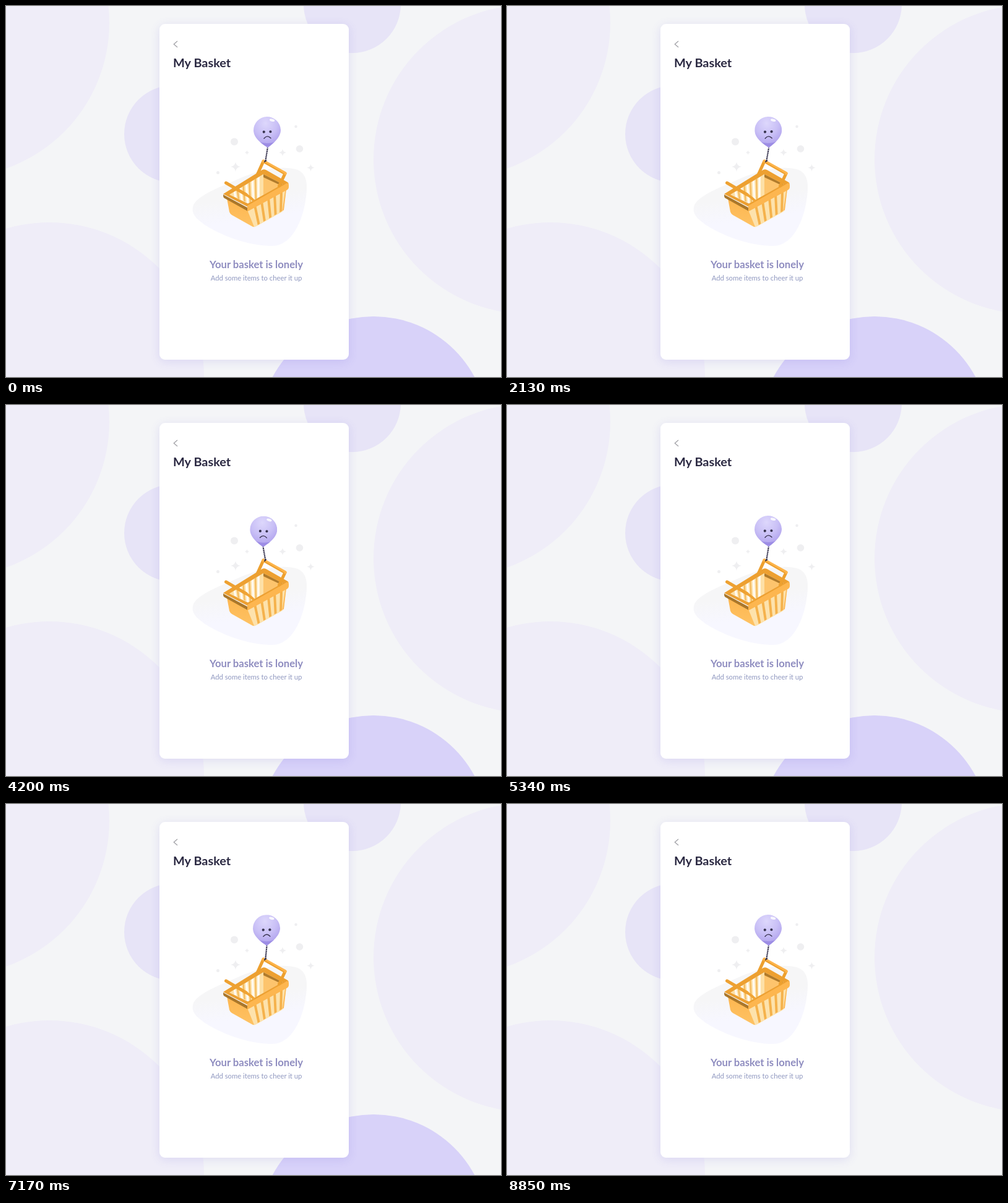
Recreate the animation shown at these times as an HTML page. Size 800 px wide and 600 px high, loop 8880 ms.

```html
<!DOCTYPE html>
<html lang="en">
<head>
<meta charset="utf-8">
<title>My Basket</title>
<style>
  @property --s { syntax: "<number>"; inherits: true; initial-value: 0; }

  html, body { margin: 0; width: 100%; height: 100%; overflow: hidden; background: #f4f5f7; }
  .stage { position: relative; width: 800px; height: 600px; overflow: hidden; }
  svg { position: absolute; left: 0; top: 0; display: block; }
  .card {
    position: absolute; left: 248px; top: 29px; width: 306px; height: 543px;
    border-radius: 9px; background: #fff;
    box-shadow: 0 3px 16px rgba(95, 75, 210, .14);
  }
  text { font-family: Lato, sans-serif; }
  .title { font-size: 19.9px; font-weight: 700; fill: #2b2942; }
  .head { font-size: 16.65px; font-weight: 700; fill: #8f8dc0; text-anchor: middle; }
  .sub { font-size: 11.25px; fill: #9098c0; text-anchor: middle; }

  /* --s is the sideways offset of the balloon in pixels */
  .sway { animation: sway 8880ms infinite; }
  .balloon {
    transform: translate(calc(423px + var(--s) * 1.3px), calc(229px - var(--s) * .12px))
               rotate(calc(-2deg - var(--s) * .62deg));
  }
  .rope { transform: translate(419.3px, 251px) rotate(calc(9.2deg + var(--s) * 3.3deg)); }
  .accent { animation: blink 8880ms step-end infinite; }

  @keyframes sway {
    0%      { --s: 0;    animation-timing-function: cubic-bezier(.39, .575, .565, 1); }
    10.484% { --s: -6.2; animation-timing-function: cubic-bezier(.47, 0, .745, .715); }
    23.986% { --s: .2;   animation-timing-function: cubic-bezier(.39, .575, .565, 1); }
    30.191% { --s: 1.8;  animation-timing-function: cubic-bezier(.47, 0, .745, .715); }
    47.297% { --s: -5.8; animation-timing-function: cubic-bezier(.39, .575, .565, 1); }
    49.899% { --s: -6.2; animation-timing-function: cubic-bezier(.47, 0, .745, .715); }
    60.135% { --s: 0;    animation-timing-function: cubic-bezier(.39, .575, .565, 1); }
    69.595% { --s: 1.8;  animation-timing-function: cubic-bezier(.47, 0, .745, .715); }
    80.743% { --s: -1;   animation-timing-function: cubic-bezier(.39, .575, .565, 1); }
    89.313% { --s: -6.2; animation-timing-function: cubic-bezier(.47, 0, .745, .715); }
    99.662%, 100% { --s: 0; }
  }
  @keyframes blink {
    0% { visibility: visible; }
    99.66%, 100% { visibility: hidden; }
  }
</style>
</head>
<body>
<div class="stage">
  <svg width="800" height="600">
    <g fill="#efedf8">
      <circle cx="-83" cy="27" r="250"/>
      <circle cx="844" cy="248" r="250"/>
      <circle cx="70" cy="600" r="250"/>
    </g>
    <g fill="#e7e4f7">
      <circle cx="269.5" cy="207" r="78.5"/>
      <circle cx="559.5" cy="-2.5" r="78.5"/>
    </g>
    <circle class="accent" cx="594" cy="687" r="185" fill="#d8d2f9"/>
  </svg>

  <div class="card"></div>

  <svg width="800" height="600">
    <defs>
      <linearGradient id="ground" x1=".2" y1="0" x2=".4" y2="1">
        <stop offset=".4" stop-color="#f6f6f7"/>
        <stop offset=".7" stop-color="#f7f7ff"/>
      </linearGradient>
      <linearGradient id="side" x1="0" y1="0" x2="0" y2="1">
        <stop offset="0" stop-color="#fdb650"/>
        <stop offset="1" stop-color="#fec263"/>
      </linearGradient>
      <radialGradient id="skin" cx=".45" cy=".22" r=".8">
        <stop offset="0" stop-color="#ddd7fc"/>
        <stop offset=".5" stop-color="#c9c0f6"/>
        <stop offset="1" stop-color="#a898ea"/>
      </radialGradient>
      <path id="star" d="M0-8Q.9-.9 8 0Q.9 .9 0 8Q-.9 .9-8 0Q-.9-.9 0-8Z"/>
      <clipPath id="skinClip">
        <path d="M0 0C-4-3-22-14-22-28A22 22 0 0 1 22-28C22-14 4-3 0 0Z"/>
      </clipPath>
      <clipPath id="wallClip">
        <path d="M390 329L453 296L449 330L402 357Z"/>
      </clipPath>
      <clipPath id="insideClip">
        <path d="M361 305L416 272L447 288L392 319Z"/>
      </clipPath>
    </defs>

    <path d="M277 56.8L271.3 61.7L277 66.8" fill="none" stroke="#a5a5aa" stroke-width="1.4"/>
    <text class="title" x="270" y="99.4">My Basket</text>

    <path fill="url(#ground)" d="M302 325C305 308 345 293 375 280C410 264 445 258 468 264C482 268 487 280 486 297
      C484 335 467 388 430 388C385 388 335 365 316 350C305 342 300 334 302 325Z"/>

    <g fill="#efeff1">
      <circle cx="369" cy="219.5" r="6"/>
      <circle cx="474.5" cy="231" r="5.8"/>
      <circle cx="342.5" cy="269.5" r="2.5"/>
      <circle cx="468.5" cy="195" r="2.3"/>
      <use href="#star" transform="translate(371 260)"/>
      <use href="#star" transform="translate(389.5 237) scale(.5)"/>
      <use href="#star" transform="translate(447 237) scale(.75)"/>
      <use href="#star" transform="translate(492.5 261.5) scale(.75)"/>
    </g>

    <!-- basket body -->
    <path fill="url(#side)" d="M357 311L391 331L402 357Q400 358 397 356L365 338Q362 336 361 333Z"/>
    <path fill="#fde2ac" d="M390 330L453 296L449 328Q448.5 331 446 333L405 356Q403 357.5 401 357Z"/>
    <g clip-path="url(#wallClip)" fill="none" stroke="#f5b24c">
      <path stroke-width="4" d="M402 322L410 360M413 316L419 355M424 310L428 350M434 304L436 345M445 298L444 340"/>
      <path stroke-width="3" stroke="#fdbb59" d="M453 296L448 332"/>
    </g>

    <!-- inside -->
    <g clip-path="url(#insideClip)">
      <path fill="#fde0a6" d="M355 265H460V330H355Z"/>
      <path fill="none" stroke="#fffaf0" stroke-width="3.6" d="M368 292L373 322M378 287L382 322M388 281L391 322M398 275L400 322M408 269V322"/>
      <path fill="none" stroke="#f4b757" stroke-width="2" d="M373 290L377 320M383 284L386 320M393 278L395 320M403 272L404 320"/>
      <path fill="#fdc46d" d="M416 270L450 288L416 308Z"/>
      <path fill="#b07b2c" d="M416 270L450 288V293L416 277Z"/>
    </g>

    <!-- rim -->
    <path fill="#eda031" fill-rule="evenodd" d="M351 304L414 265Q417 263.5 420 265L455 285Q458 287 455 289L391 325Z
      M361 305L391 319.5L447 288L416 272Z"/>
    <path fill="#aa772a" d="M351 305L391 326.5V332L352.5 310.5Q351 309 351 307Z"/>
    <path fill="#fdb64f" d="M390 323L454 286.5Q457 286 457 289V293Q457 295.5 455 297L390 332.5Z"/>

    <!-- handles -->
    <g fill="none" stroke-linejoin="round" stroke-linecap="round">
      <path stroke="#eda02f" stroke-width="5" d="M406.5 272L416 251M451 271L441.5 291"/>
      <path stroke="#fdb44b" stroke-width="5" d="M416 251L451 270.5"/>
      <path stroke="#eda02f" stroke-width="2" d="M417 253L449 271.5"/>
      <path stroke="#eea131" stroke-width="5" d="M355.5 286L388 305"/>
      <path stroke="#f0a435" stroke-width="4" d="M386 304Q395 309 400.5 315"/>
    </g>

    <g class="sway">
      <g class="rope" fill="none" stroke="#312e4a">
        <path stroke-width="2.2" stroke-dasharray="2.3 .7" d="M0 0V-22"/>
        <path stroke-width="2" stroke-linecap="round" d="M-1.3 1L.8-1"/>
      </g>
      <g class="balloon">
        <g clip-path="url(#skinClip)">
          <rect x="-23" y="-51" width="46" height="52" fill="url(#skin)"/>
          <path fill="#9686e2" opacity=".75" d="M-17-11Q0-3 17-11V2H-17Z"/>
        </g>
        <ellipse cx="8.7" cy="-44" rx="4.3" ry="2.1" transform="rotate(16 8.7 -44)" fill="#fff" opacity=".85"/>
        <g fill="#38334f">
          <circle cx="-5.3" cy="-25.6" r="2.1"/>
          <circle cx="5.3" cy="-25.6" r="2.1"/>
        </g>
        <path fill="none" stroke="#38334f" stroke-width="1.4" stroke-linecap="round" d="M-5.5-15Q0-21.2 5.5-15"/>
      </g>
    </g>

    <text class="head" x="404.5" y="423.7">Your basket is lonely</text>
    <text class="sub" x="404.5" y="443.5">Add some items to cheer it up</text>
  </svg>
</div>
</body>
</html>
```
